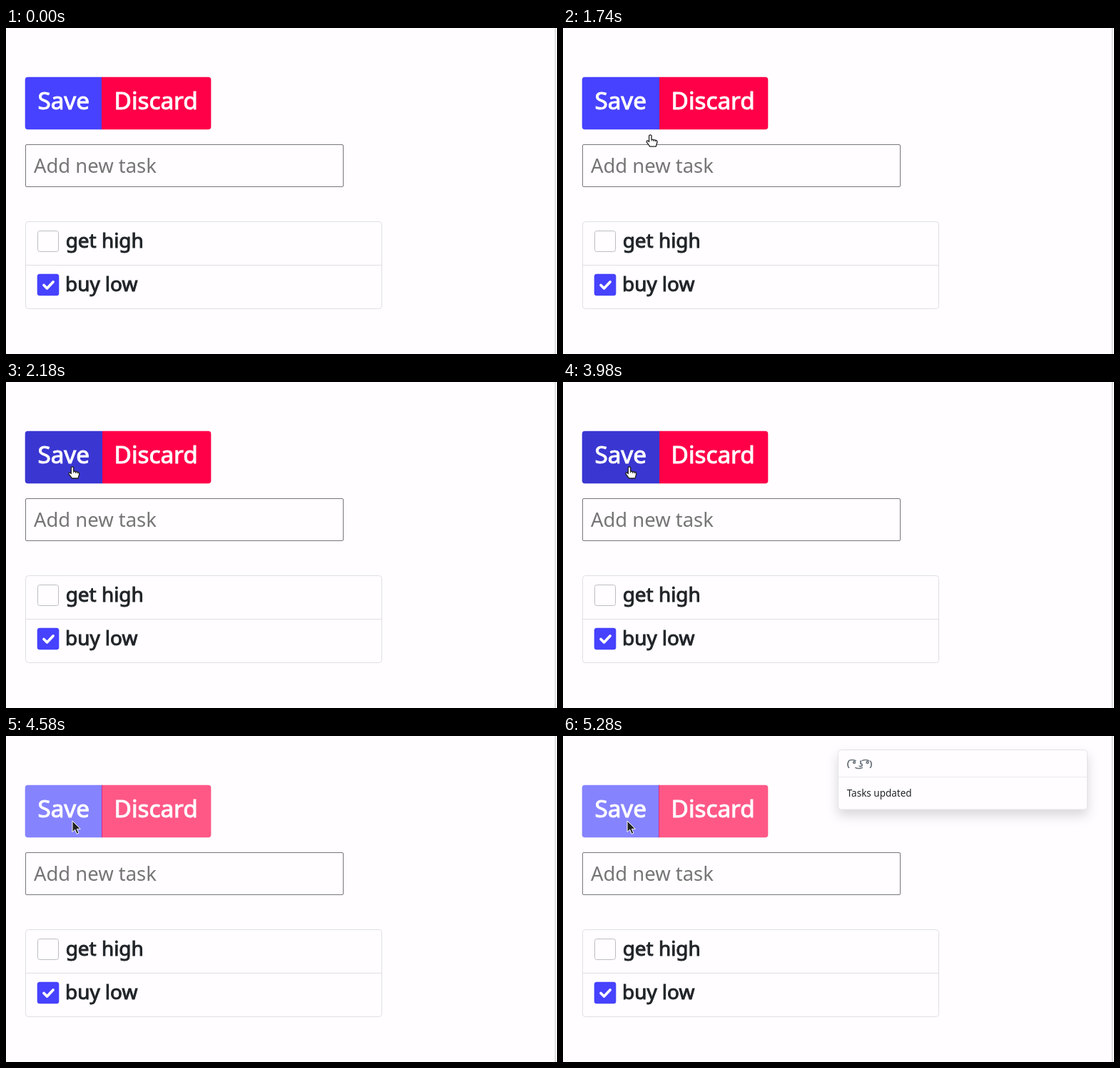
An HTML page for the animation above (8 s loop, 772 px wide and 457 px high).

```html
<!DOCTYPE html>
<html>
<head>
<meta charset="utf-8">
<style>
html, body { margin: 0; width: 100%; height: 100%; overflow: hidden; background: #fffdff; }
svg { display: block; width: 772px; height: 457px; }
text { font: 27.9px "Noto Sans", "Open Sans", sans-serif; white-space: pre; }
.medium { stroke-width: 1; }
.button { font-size: 33.3px; fill: #fff; stroke: #fff; }
.task { fill: #212529; stroke: #212529; }
#toast { filter: drop-shadow(0 8px 8px rgba(0, 0, 0, .15)); }
</style>
</head>
<body>
<svg viewBox="0 0 772 457">
  <clipPath id="group"><rect x="26.7" y="68.7" width="260.6" height="73.6" rx="4"/></clipPath>
  <path d="M769.5 0V457" stroke="#c8c8cc"/>

  <g clip-path="url(#group)">
    <g id="save">
      <rect id="saveFill" x="26" y="68" width="109" height="75"/>
      <text class="button medium" x="44.4" y="114">Save</text>
    </g>
    <g id="discard">
      <rect id="discardFill" x="134" y="68" width="154" height="75" fill="#ff0048"/>
      <text class="button medium" x="151.6" y="114">Discard</text>
    </g>
  </g>
  <rect id="ring" x="25.5" y="67.5" width="111" height="76" rx="5" fill="none" stroke="#a29fff" stroke-width="3"/>

  <rect id="field" x="27.5" y="163.5" width="445" height="59" rx="1.5" fill="#fffdff"/>
  <text x="39" y="203" style="font-size:27.4px" fill="#757575">Add new task</text>

  <g fill="none" stroke="#dfdfe1">
    <rect x="27.5" y="271.5" width="499" height="122" rx="4"/>
    <path d="M28 332.5H526"/>
    <rect x="44.5" y="284.5" width="29" height="29" rx="3" stroke="#bcbcc0"/>
  </g>
  <rect x="43.7" y="344.7" width="30.6" height="30.6" rx="3.5" fill="#4642ff"/>
  <path d="M53 360.5L57.5 365L66 356" fill="none" stroke="#fff" stroke-width="3.8" stroke-linecap="round" stroke-linejoin="round"/>
  <text class="task medium" x="83.7" y="308">get high</text>
  <text class="task medium" x="83" y="369">buy low</text>

  <g id="toast">
    <rect x="385.5" y="19.5" width="349" height="83.5" rx="4" fill="#fffdff" stroke="#e4e3e6"/>
    <path d="M386 57.5H734" stroke="#ebeaed"/>
    <text x="397.4" y="43" style="font:11.2px 'DejaVu Sans',sans-serif" fill="#6c757d" stroke="#6c757d" stroke-width=".8">( ͡° ͜ʖ ͡°)</text>
    <text x="397.7" y="85" style="font-size:13.5px" fill="#212529">Tasks updated</text>
  </g>

  <g id="cursor">
    <path id="arrow" d="M0 0V15.5L3.7 12.2L6.2 18.3L8.9 17.1L6.4 11.3H11.3Z" fill="#222" stroke="#fff"/>
    <g id="beam" fill="none">
      <path d="M-3.5-7H3.5M0-7V7M-3.5 7H3.5" stroke="#fff" stroke-width="3"/>
      <path d="M-3.5-7H3.5M0-7V7M-3.5 7H3.5" stroke="#222" stroke-width="1.2"/>
    </g>
    <g id="hand" stroke="#222" stroke-width="1.3" stroke-linejoin="round">
      <path d="M-1.7 .8Q0-1 1.7 .8V6L8 7.3Q10 8 9.6 10.5L8 16H-.5L-5 10Q-5.4 7.8-3.5 8L-1.7 9.5Z" fill="#fff"/>
      <path d="M1.8 6V8.5M4.5 6.8V9M7 7.3V9.5" fill="none" stroke-width="1"/>
    </g>
  </g>
</svg>
<script>
const LOOP = 8000;
const $ = id => document.getElementById(id);
const ramp = (t, from, to) => Math.min(1, Math.max(0, (t - from) / (to - from)));
const fade = (t, from, length = 150) => {
  const p = ramp(t, from, from + length);
  return p * p * (3 - 2 * p);
};
const pulse = (t, from, to) => fade(t, from) * (1 - fade(t, to));
const mix = (a, b, p) => `rgb(${a.map((v, i) => Math.round(v + (b[i] - v) * p))})`;

// Each pointer move slows down as it reaches its goal
const moves = [
  { from: 500, to: 780, x: 165, y: 271 },
  { from: 940, to: 1060, x: 165, y: 217 },
  { from: 1340, to: 1480, x: 160, y: 190 },
  { from: 1620, to: 2180, x: 93, y: 119 },
  { from: 5260, to: 5280, x: 90, y: 119 }
];

function pointerAt(t) {
  let x = 197, y = 457;
  for (const move of moves) {
    const p = 1 - (1 - ramp(t, move.from, move.to)) ** 3.4;
    x += (move.x - x) * p;
    y += (move.y - y) * p;
  }
  return `${x} ${y}`;
}

function draw(t) {
  const shape = t < 940 || t >= 4550 ? "arrow" : t < 1640 ? "beam" : "hand";
  $("cursor").setAttribute("transform", `translate(${pointerAt(t)})`);
  for (const id of ["arrow", "beam", "hand"]) $(id).style.display = id === shape ? "" : "none";

  $("field").style.stroke = mix([118, 118, 124], [88, 88, 98], pulse(t, 940, 1340));
  $("saveFill").style.fill = mix([70, 66, 255], [58, 54, 210], pulse(t, 1740, 4260));
  $("discardFill").setAttribute("x", t >= 1660 && t < 4300 ? 135 : 134);
  $("ring").style.opacity = pulse(t, 3980, 4260);
  $("save").style.opacity = $("discard").style.opacity = 1 - .35 * fade(t, 4260);
  $("toast").style.opacity = ramp(t, 4800, 5140);
}

function tick() {
  draw(performance.now() % LOOP);
  requestAnimationFrame(tick);
}
tick();
</script>
</body>
</html>
```
